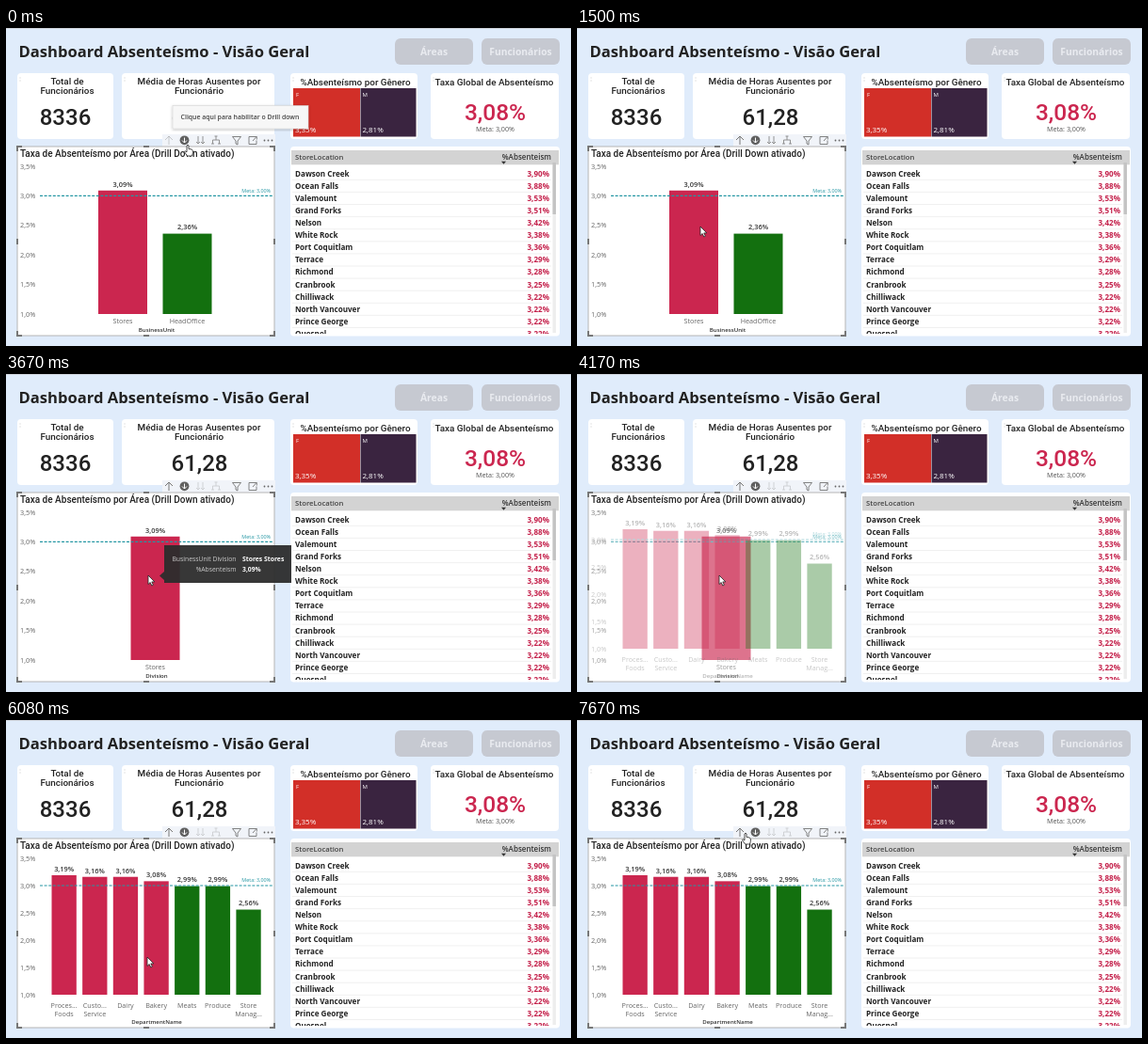
An HTML page for the animation above (8 s loop, 600x338 px).

```html
<!DOCTYPE html>
<html lang="pt">
<head>
<meta charset="utf-8">
<title>Dashboard Absenteísmo</title>
<style>
  html, body { margin: 0; width: 100%; height: 100%; overflow: hidden; background: #e0ecfb; }
  svg { display: block; width: 100vw; height: 100vh; }
  text { font-family: "Open Sans", "Noto Sans", sans-serif; fill: #333; }
  .din { font-family: Roboto, Inter, sans-serif; font-weight: 500; fill: #222; }
  .bold { font-weight: 700; }
  .semi { font-weight: 600; }
  .mid { text-anchor: middle; }
  .end { text-anchor: end; }
</style>
</head>
<body>
<svg id="stage" viewBox="0 0 600 338"></svg>
<script>
const LOOP = 8000;
const RED = '#cb264f', GREEN = '#13700f', TEAL = '#2496a3';

const rect = (x, y, w, h, fill, extra = '') =>
  `<rect x="${x}" y="${y}" width="${w}" height="${h}" fill="${fill}" ${extra}/>`;
const text = (x, y, size, content, cls = '', fill = '') =>
  `<text x="${x}" y="${y}" font-size="${size}" class="${cls}" ${fill && `style="fill:${fill}"`}>${content}</text>`;
const line = (d, stroke, width = 1, extra = '') =>
  `<path d="${d}" fill="none" stroke="${stroke}" stroke-width="${width}" ${extra}/>`;
const group = (id, content, extra = '') => `<g id="${id}" ${extra}>${content}</g>`;

function header() {
  const button = (x, label) => rect(x, 11, 83, 28, '#c6c9d1', 'rx="6"') +
    text(x + 41.5, 28.6, 10.3, label, 'bold mid', '#e9ebf0');
  return rect(0, 0, 600, 1, '#cfd4dc') +
    text(13.5, 30.9, 16.6, 'Dashboard Absenteísmo - Visão Geral', 'bold', '#222') +
    button(413, 'Áreas') + button(505, 'Funcionários');
}

function cards() {
  const card = (x, w) => rect(x, 48, w, 70, '#fff', 'rx="4"') +
    line(`M${x + 3} 52.5v1m0 2v1`, '#bbb', .8);
  const title = (x, y, label) => text(x, y, 9.9, label, 'din mid');
  return card(12, 102) + card(123, 162) + card(302, 135) + card(451, 136) +
    title(65, 60.3, 'Total de') + title(65, 69.8, 'Funcionários') +
    text(63, 103, 24, '8336', 'din mid') +
    title(205, 60.3, 'Média de Horas Ausentes por') + title(205, 69.8, 'Funcionário') +
    text(205.5, 103, 24, '61,28', 'din mid') +
    title(371, 61, '%Absenteísmo por Gênero') +
    rect(305, 64, 71, 51.5, '#d22f28') + rect(376.5, 64, 59, 51.5, '#3a2440') +
    text(308, 73, 6, 'F', '', '#fff') + text(378.5, 73, 6, 'M', '', '#fff') +
    text(307, 111, 8, '3,35%', '', '#fff') + text(378.5, 111, 8, '2,81%', '', '#fff') +
    title(518.5, 61, 'Taxa Global de Absenteísmo') +
    text(519.5, 98, 24.5, '3,08%', 'din mid', RED) +
    text(519.5, 109.5, 7.2, 'Meta: 3,00%', 'mid', '#555');
}

function table() {
  const rows = ['Dawson Creek 3,90', 'Ocean Falls 3,88', 'Valemount 3,53', 'Grand Forks 3,51',
    'Nelson 3,42', 'White Rock 3,38', 'Port Coquitlam 3,36', 'Terrace 3,29', 'Richmond 3,28',
    'Cranbrook 3,25', 'Chilliwack 3,22', 'North Vancouver 3,22', 'Prince George 3,22', 'Quesnel 3,22'];
  const body = rows.map((row, i) => {
    const y = 157.6 + i * 13.1, cut = row.lastIndexOf(' ');
    return text(307, y, 8.1, row.slice(0, cut), 'bold', '#222') +
      text(577, y, 8.1, row.slice(cut + 1) + '%', 'bold end', '#c4214b') +
      line(`M304 ${y + 3.7}H579`, '#ececec', .8);
  }).join('');
  return rect(302, 126, 286, 201.5, '#fff', 'rx="4"') +
    rect(303, 130, 284, 15.3, '#d3d3d3') +
    text(307, 140, 7.7, 'StoreLocation', 'semi', '#444') +
    text(579, 140, 8, '%Absenteism', 'semi end') +
    '<path d="M526 141.8h5l-2.5 3z" fill="#333"/>' +
    `<g clip-path="url(#tableClip)">${body}</g>` +
    rect(580.5, 147, 3.5, 177, '#eee') + rect(580.5, 143, 3.5, 55, '#c4c4c4');
}

function toolbar() {
  return rect(166, 113, 120, 13, '#f1f4f9') +
    group('up', line('M173 124v-9m-4 4l4-4l4 4', '#777')) +
    '<circle cx="189.5" cy="119.3" r="4.9" fill="#606060"/>' +
    line('M189.5 116.5v5.5m-2.5-2.5l2.5 2.5l2.5-2.5', '#fff') +
    group('levels', line('M204 115v8m-2-2l2 2l2-2M209 115v8m-2-2l2 2l2-2', '#888', .9) +
      line('M223 115v4m-3.5 4v-4h7v4M221.5 115h3M218 123h3M225 123h3', '#888', .9)) +
    line('M240.5 115.5h9l-3.5 4.5v4l-2-1v-3z', '#777', .9) +
    line('M263 115.5h-5v8h8v-4M262 120l4-4.5m-3 0h3.3v3', '#777', .9) +
    [274.5, 278.5, 282.5].map(x => `<circle cx="${x}" cy="119.5" r=".9" fill="#666"/>`).join('');
}

// Bars are [label, value, left edge]; a space in a label marks a second line.
function chart(id, base, unit, width, labelY, bars, axisTitle) {
  const yOf = value => base - (value - 1) * unit;
  const ticks = [3.5, 3, 2.5, 2, 1.5, 1].map(v =>
    text(15, yOf(v) + 2.5, 7.3, v.toFixed(1).replace('.', ',') + '%', '', '#666')).join('');
  const columns = bars.map(([label, value, x]) => {
    const mid = x + width / 2, top = yOf(value);
    return rect(x, top, width, base - top, value > 3 ? RED : GREEN) +
      text(mid, top - 4.2, 7.4, value.toFixed(2).replace('.', ',') + '%', 'semi mid') +
      label.split(' ').map((part, i) => text(mid, labelY + i * 8.7, 7.2, part, 'mid', '#666')).join('');
  }).join('');
  const goal = yOf(3);
  return group(id, ticks + columns +
    line(`M36 ${goal}H284`, TEAL, 1.1, 'stroke-dasharray="3 1.6"') +
    text(281, goal - 3.6, 5.4, 'Meta: 3,00%', 'end', TEAL) +
    text(160, 323, 6.1, axisTitle, 'semi mid'));
}

function chartPanel() {
  const departments = [['Proces... Foods', 3.19], ['Custo... Service', 3.16], ['Dairy', 3.16],
    ['Bakery', 3.08], ['Meats', 2.99], ['Produce', 2.99], ['Store Manag...', 2.56]]
    .map(([label, value], i) => [label, value, 48.5 + i * 32.65]);
  const handles = 'M12 131v-5h5M280 126h5v5M12 322v5h5M280 327h5v-5' +
    'M146 126h6M146 327h6M12 224v6M285 224v6';
  return rect(12, 126, 273, 201, '#fff', 'stroke="#b5b5b5"') + line(handles, '#777', 2) +
    text(15, 137, 10, 'Taxa de Absenteísmo por Área (Drill Down ativado)', 'din') +
    chart('units', 304, 62.8, 52, 314, [['Stores', 3.09, 98], ['HeadOffice', 2.36, 166.5]], 'BusinessUnit') +
    chart('division', 304, 62.8, 52, 314, [['Stores', 3.09, 132.5]], 'Division') +
    chart('departments', 292, 58, 26.3, 305.8, departments, 'DepartmentName');
}

const hint = () => group('hint',
  rect(177, 82.5, 144, 24.5, '#f7f7f7', 'stroke="#d5d5d5" stroke-width=".6" filter="url(#shadow)"') +
  text(248.5, 97.3, 6.9, 'Clique aqui para habilitar o Drill down', 'semi mid', '#444'));

const dataTip = () => group('dataTip',
  '<path d="M168 182H303V222H168V219L163 214.5L168 210Z" fill="#2d2d2d" opacity=".95"/>' +
  text(244.5, 198.8, 6.8, 'BusinessUnit Division', 'end', '#ccc') +
  text(244.5, 210, 6.8, '%Absenteism', 'end', '#ccc') +
  text(251, 198.8, 6.8, 'Stores Stores', 'bold', '#fff') +
  text(251, 210, 6.8, '3,09%', 'bold', '#fff'));

const pointer = () => group('pointer',
  group('arrow', '<path d="M0 0V9.5L2.2 7.5L3.8 11L5.4 10.2L3.8 6.9H6.8Z"/>') +
  group('hand', '<path d="M-1 1Q0-.8 1 1V4.5Q5 4.4 5.5 6.5V8.5L4.5 12H-.5L-3.7 7.4Q-3.4 6-1 7.8Z"/>'),
  'fill="#fff" stroke="#222" stroke-width=".8" stroke-linejoin="round"');

document.getElementById('stage').innerHTML =
  `<defs><clipPath id="tableClip">${rect(303, 146, 284, 179, '#000')}</clipPath>
   <filter id="shadow"><feDropShadow dx="0" dy="1" stdDeviation="1.5" flood-opacity=".25"/></filter></defs>` +
  rect(0, 0, 600, 338, '#e0ecfb') + header() + cards() + table() + toolbar() + chartPanel() +
  hint() + dataTip() + pointer();

// Time, x and y of the pointer tip
const PATH = [[80, 193, 124], [600, 112, 222], [1050, 131, 211], [1750, 131, 211], [2150, 149, 214],
  [2830, 149, 214], [3150, 151, 214], [4480, 151, 214], [5200, 131, 309], [5400, 131, 309],
  [5920, 150, 252], [6250, 150, 252], [6800, 184, 157], [7080, 184, 157], [7550, 179, 120]];

const el = id => document.getElementById(id);
const clamp = v => Math.max(0, Math.min(1, v));
const ramp = (t, start, length) => clamp((t - start) / length);
const show = (id, opacity) => el(id).setAttribute('opacity', opacity);

function pointerAt(t) {
  const next = PATH.findIndex(p => p[0] > t);
  if (next < 0) return PATH[PATH.length - 1].slice(1);
  if (next === 0) return PATH[0].slice(1);
  const [t0, x0, y0] = PATH[next - 1], [t1, x1, y1] = PATH[next];
  const u = (t - t0) / (t1 - t0), k = u * u * (3 - 2 * u);
  return [x0 + (x1 - x0) * k, y0 + (y1 - y0) * k];
}

function draw(t) {
  const first = ramp(t, 1900, 200), second = ramp(t, 4100, 200);
  show('units', 1 - first);
  show('division', first * (1 - second));
  show('departments', second);
  show('hint', 1 - ramp(t, 160, 160));
  show('dataTip', ramp(t, 3000, 150) * (1 - ramp(t, 4050, 120)));
  show('up', t < 1300 ? .35 : 1);
  show('levels', 1 - .65 * ramp(t, 2420, 200));

  const [x, y] = pointerAt(t);
  const overToolbar = y < 126;
  el('pointer').setAttribute('transform', `translate(${x} ${y})`);
  show('hand', overToolbar ? 1 : 0);
  show('arrow', overToolbar ? 0 : 1);
}

const start = performance.now();
function tick() {
  draw((performance.now() - start) % LOOP);
  requestAnimationFrame(tick);
}
tick();
</script>
</body>
</html>
```
